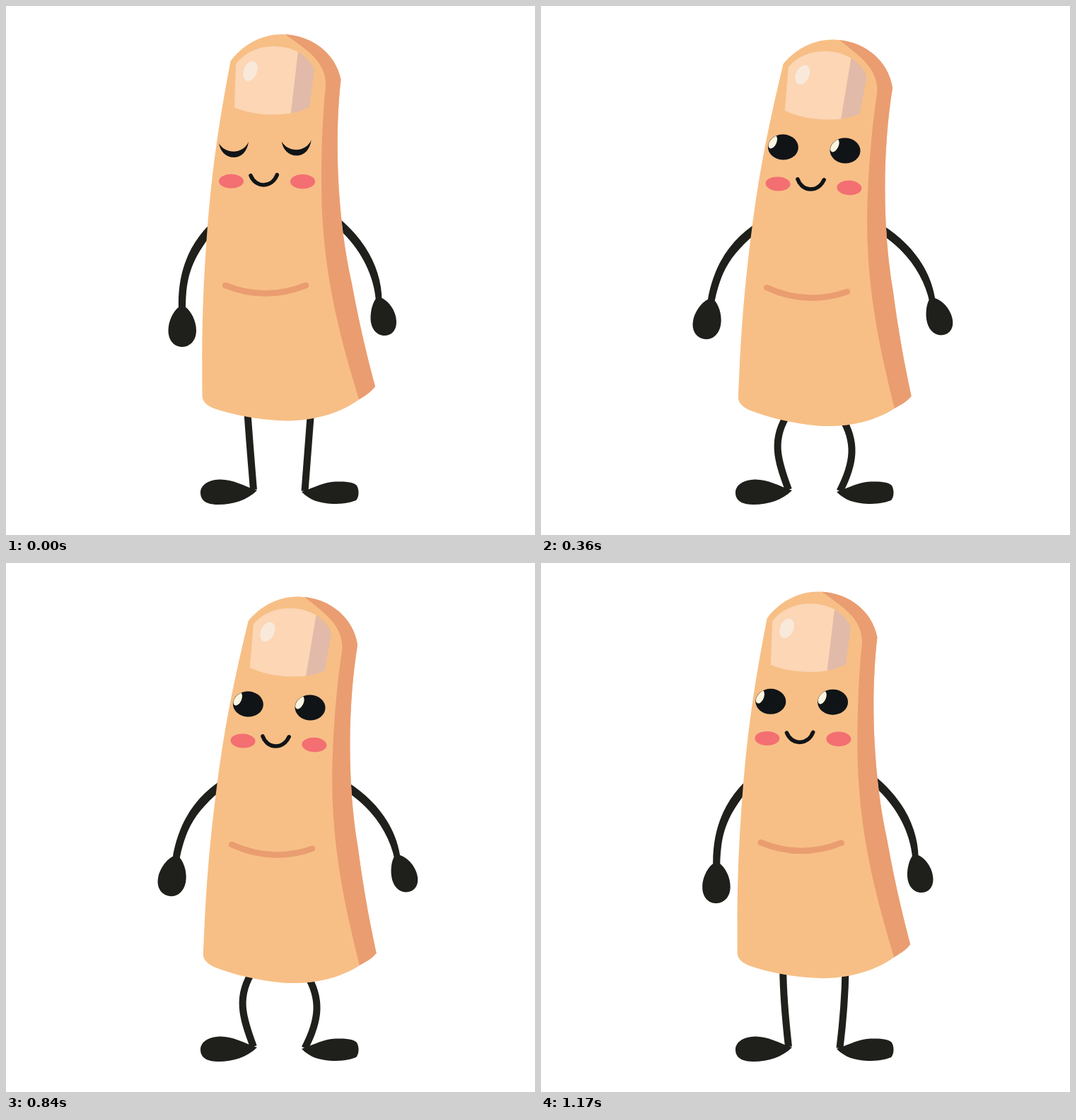
An HTML page that plays this animation: 748 by 748 pixels, repeating every 1200 ms.

```html
<!DOCTYPE html>
<html lang="en">
<head>
<meta charset="utf-8">
<title>Swaying finger</title>
<style>
  html, body { margin: 0; width: 100%; height: 100%; overflow: hidden; background: #fff; }
  svg { display: block; width: 100%; height: 100%; }
  .limb { fill: #1f1f1b; }
  .leg { fill: none; stroke: #1f1f1b; stroke-width: 10; }
  .skin { fill: #f7bf86; }
  .shade { fill: #ea9d71; }
  .cheek { fill: #f36f72; }
  .eye { fill: #101417; }
  .glint { fill: #fbf5e0; }
</style>
</head>
<body>
<svg viewBox="0 0 748 748">
  <defs>
    <clipPath id="eyeClip"><ellipse rx="21.2" ry="17.8"/></clipPath>
    <g id="openEye">
      <ellipse class="eye" rx="21.5" ry="18"/>
      <g clip-path="url(#eyeClip)">
        <ellipse class="glint" rx="5.6" ry="10" transform="translate(-15.2 -6.8) rotate(20)"/>
      </g>
    </g>
    <path id="closedEye" class="eye" d="M301 194C310 210 335 210 343 192C341 206 333 214 322 214C311 214 303 206 301 194Z"/>
  </defs>

  <path id="legL" class="leg"/>
  <path id="legR" class="leg"/>
  <path class="limb" d="M355 685C335 678 320 669 302 669.5C285 670 275 678 275 688C275 699 283 705 300 705C322 705 340 699 355 685Z"/>
  <path class="limb" d="M418 687C438 680 450 673 466 672.5C480 672 492 673 496 678C500 685 499 695 495 699C485 703 475 704 462 704C443 703 430 699 418 687Z"/>

  <g id="armL" class="limb">
    <path d="M302 296C262 328 242 372 244 428L254 428C254 385 262 362 285 330L302 312Z"/>
    <path d="M249 423C258 426 269 442 269 459C269 473 260 482 249 482C238 482 229.5 473 229.5 459C229.5 442 240 426 249 423Z"/>
  </g>
  <g id="armR" class="limb">
    <path d="M462 293C505 325 532 370 531.5 418L523 418C521 385 505 349 476 320.5L462 308Z"/>
    <path d="M526 411C540 414 552 431 552 447C552 459 545 466 535 466C524 466 515.5 456 515.5 441C515.5 428 520 415 526 411Z"/>
  </g>

  <g id="body">
    <path class="skin" d="M317.5 78C332 58 358 40 390 40C430 40 466 66 473.5 104C464 190 468.5 300 488.5 390C498 442 509 490 522 538C516 546 508 551 499 556.5C470 578 430 587 394 586.5C355 585 320 578 294 569C284 565 277 559 277.5 550C277 480 277 420 284 325C290 240 300 170 317.5 78Z"/>
    <path class="shade" d="M395 40.2C432 42 466 66 473.5 104C464 190 468.5 300 488.5 390C498 442 509 490 522 538C516 546 508 551 499 556.5C470 460 446 370 446 250C446 200 448 150 452 113C453 78 425 62 395 40.2Z"/>

    <path fill="#fcd6b5" d="M325 82C338 65 358 57 379 57C392 57 403 60 413 65L403 151.5C375 156 345 153 323 143.5Z"/>
    <path fill="#e1baa9" d="M413 65C421 69 432 80 436 90L429 143C421 147 412 150 403 151.5Z"/>
    <ellipse fill="#f8e9db" rx="9.5" ry="14.5" transform="translate(345.5 92) rotate(22)"/>

    <g id="open">
      <use href="#openEye" x="323.2" y="195.5"/>
      <use href="#openEye" x="411" y="196"/>
    </g>
    <g id="closed">
      <use href="#closedEye"/>
      <use href="#closedEye" x="88.7" y="-2.5"/>
    </g>
    <ellipse class="cheek" cx="318.5" cy="247.7" rx="17.5" ry="10"/>
    <ellipse class="cheek" cx="419.5" cy="248.2" rx="17.5" ry="10.3"/>
    <path d="M346 239.7C353 257.5 376 257.5 383.3 238.7" fill="none" stroke="#101417" stroke-width="5.5" stroke-linecap="round"/>
    <path d="M310 395Q367 418 424 395" fill="none" stroke="#ea9d71" stroke-width="8.5" stroke-linecap="round"/>
  </g>
</svg>
<script>
const LOOP = 1200, STEP = 30, BLINK = 60;
const $ = id => document.getElementById(id);

// Turn in degrees at full sway, then the pivot.
const turns = {
  body: [4.81, 252, 578],
  armL: [19.1, 295.2, 380.3],
  armR: [-12.7, 546, 220]
};

// Cubic control points: standing, then fully bent.
const legs = {
  legL: [[341.5, 575, 344, 612, 347, 648, 350, 684],
         [356.5, 575, 312, 612, 326, 639, 350, 684]],
  legR: [[431, 575, 428.5, 612, 425.5, 649, 422.5, 686],
         [421, 586, 458, 618.7, 455, 644.5, 422.5, 686]]
};

function draw(time) {
  const t = Math.floor((time % LOOP) / STEP + 1e-6) * STEP;
  const sway = 1 - Math.abs(1 - t / (LOOP / 2));

  for (const [id, [deg, x, y]] of Object.entries(turns))
    $(id).setAttribute('transform', `rotate(${deg * sway} ${x} ${y})`);

  for (const [id, [from, to]] of Object.entries(legs)) {
    const p = from.map((v, i) => v + (to[i] - v) * sway);
    $(id).setAttribute('d', `M${p.slice(0, 2)}C${p.slice(2)}`);
  }

  const shut = t < BLINK;
  $('open').style.display = shut ? 'none' : '';
  $('closed').style.display = shut ? '' : 'none';
}

const start = performance.now();
function tick() {
  draw(performance.now() - start);
  requestAnimationFrame(tick);
}
tick();
</script>
</body>
</html>
```
